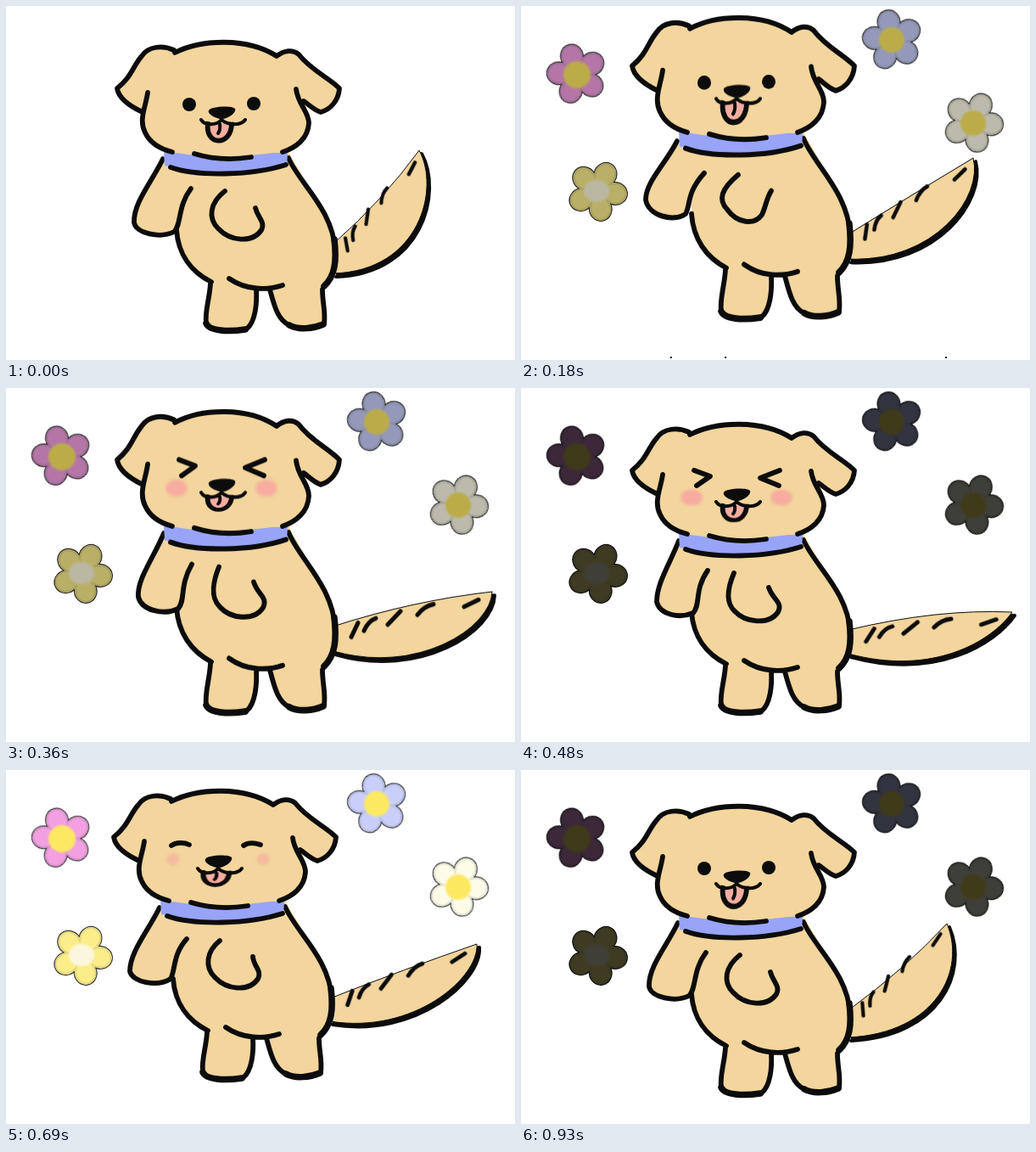
Write an HTML page without scripts that moves like this. It is 600 px wide and 417 px high and loops after 990 ms.

```html
<!DOCTYPE html>
<html lang="en">
<head>
<meta charset="utf-8">
<title>Happy puppy</title>
<style>
html, body { margin: 0; width: 100%; height: 100%; overflow: hidden; background: #fff; }
svg { display: block; width: 100vw; height: 100vh; }

/* Nine held poses played forwards, then backwards. */
.dog, .tail, .hashes, .arm, .paw, .tongue, .flowers, .open, .smile, .squint, .blush {
  animation: 495ms step-end -962ms infinite alternate;
}

.line { fill: none; stroke: #0c0c0c; stroke-width: 5.8; stroke-linecap: round; stroke-linejoin: round; }
.heavy { stroke-width: 7.5; }
.thin { stroke-width: 4; }
.fur { fill: #f3d59d; }
.ink { fill: #0c0c0c; }

.dog { transform-origin: 0 382px; animation-name: hop; }
@keyframes hop {
  18.18% { transform: scaleY(1.044); }
  30.3% { transform: translateY(-14px) scaleY(1.044); }
  42.42% { transform: translate(-2px, -20px) scaleY(1.02); }
  54.55% { transform: translate(-4px, -18px); }
  66.67% { transform: scaleY(1.044); }
  78.79%, 100% { transform: none; }
}

.tail { d: path("M386 280Q445 228 487 170C512 215 488 312 386 315"); animation-name: wag; }
@keyframes wag {
  6.06% { d: path("M386 283Q452 235 502 181C525 235 490 310 386 315"); }
  18.18% { d: path("M386 285Q458 238 517 191C535 240 488 315 386 315"); }
  30.3% { d: path("M386 287Q465 240 533 201C545 245 488 319 386 315"); }
  42.42% { d: path("M386 287Q470 246 547 212C554 254 488 326 386 315"); }
  54.55% { d: path("M386 287Q475 252 559 223C562 262 485 330 386 314"); }
  66.67% { d: path("M386 285Q480 256 573 246C572 287 485 340 386 313"); }
  78.79% { d: path("M386 285Q490 255 576 254C560 288 486 338 386 313"); }
  90.91%, 100% { d: path("M386 285Q490 260 579 264C555 298 486 340 386 313"); }
}

.hashes { stroke-width: 5; transform-origin: 391px 295px; transform: rotate(-37deg) scale(.84); animation-name: swing; }
@keyframes swing {
  6.06% { transform: rotate(-31deg) scale(.85); }
  18.18% { transform: rotate(-24deg) scale(.87); }
  30.3% { transform: rotate(-18deg) scale(.91); }
  42.42% { transform: rotate(-13deg) scale(.94); }
  54.55% { transform: rotate(-8deg) scale(.97); }
  66.67% { transform: none; }
  78.79% { transform: rotate(3deg); }
  90.91%, 100% { transform: rotate(6deg); }
}

.arm { d: path("M185 180C172 207 150 232 151 255C153 268 182 274 198 266C207 258 202 236 218 215"); animation-name: arm; }
@keyframes arm {
  30.3% { d: path("M184 182C170 208 147 228 147 248C150 266 180 274 194 264C200 254 195 240 216 218"); }
  54.55% { d: path("M185 180C172 207 150 232 150 255C153 268 182 274 198 264C204 254 200 236 217 217"); }
  66.67% { d: path("M186 180C174 208 154 232 156 252C160 267 186 273 203 265C212 255 204 240 219 215"); }
  78.79%, 100% { d: path("M186 180C175 208 160 230 160 252C164 267 186 272 203 265C212 255 204 238 220 215"); }
}

.paw { d: path("M258 218C240 232 238 250 250 262C264 277 290 280 301 264C306 254 297 250 294 238"); animation-name: paw; }
@keyframes paw {
  30.3% { d: path("M256 220C236 236 232 248 243 259C255 275 275 277 284 265C289 255 289 247 295 238"); }
  42.42% { d: path("M256 219C240 232 238 250 250 262C264 277 290 280 301 264C306 254 296 250 295 238"); }
  66.67%, 100% { d: path("M251 218C245 232 240 252 252 263C264 276 292 280 303 264C309 252 297 250 292 235"); }
}

.tongue { transform-origin: 252px 138px; animation-name: lick; }
@keyframes lick {
  6.06% { transform: scaleY(1.1); }
  54.55% { transform: scale(1.08, .75); }
  66.67% { transform: scaleY(.75); }
  78.79%, 100% { transform: scaleY(.86); }
}

.flowers { visibility: hidden; animation-name: glow; }
@keyframes glow {
  6.06% { visibility: visible; filter: brightness(.25); }
  18.18% { visibility: visible; filter: brightness(.49); }
  30.3% { visibility: visible; filter: brightness(.74); }
  42.42% { visibility: visible; filter: none; }
  66.67% { visibility: visible; filter: brightness(.74); }
  78.79% { visibility: visible; filter: brightness(.49); }
  90.91%, 100% { visibility: visible; filter: brightness(.25); }
}

.smile, .squint, .blush { visibility: hidden; }
.open { animation-name: open; }
.smile { animation-name: smile; }
.squint { animation-name: squint; }
.blush { fill: #f8a8a0; transform-box: fill-box; transform-origin: center; animation-name: blush; }
@keyframes open { 54.55%, 100% { visibility: hidden; } }
@keyframes smile { 54.55% { visibility: visible; } 66.67%, 100% { visibility: hidden; } }
@keyframes squint { 66.67%, 100% { visibility: visible; } }
@keyframes blush {
  54.55% { visibility: visible; opacity: .6; transform: translateY(-6px) scale(.42, .7); }
  66.67% { visibility: visible; opacity: .9; transform: scale(.75, .95); }
  78.79%, 100% { visibility: visible; }
}

.specks { visibility: hidden; animation: specks 990ms step-end infinite; }
@keyframes specks { 18.1% { visibility: visible; } 24.1% { visibility: hidden; } }
</style>
</head>
<body>
<svg viewBox="0 0 600 417" preserveAspectRatio="none">
  <defs>
    <path id="petals" d="M-12.3-17A13 14 0 1 1 12.3-17A13 14 72 1 1 20 6.5A13 14 144 1 1 0 21A13 14 36 1 1-20 6.5A13 14 108 1 1-12.3-17Z"/>
    <clipPath id="inside"><use href="#petals"/></clipPath>
    <g id="flower">
      <use href="#petals" stroke="#333" stroke-width="1.8"/>
      <use href="#petals" stroke="#555" stroke-opacity=".14" stroke-width="5" clip-path="url(#inside)"/>
    </g>
    <filter id="soft"><feGaussianBlur stdDeviation="1.2"/></filter>
    <filter id="haze" x="-30%" y="-30%" width="160%" height="160%"><feGaussianBlur stdDeviation="1.8"/></filter>
  </defs>

  <g class="flowers">
    <use href="#flower" fill="#f3a0e2" transform="translate(66 80) rotate(-16)"/>
    <use href="#flower" fill="#c9cffa" transform="translate(438 40) rotate(-12)"/>
    <use href="#flower" fill="#fdfce8" transform="translate(533 137) rotate(24)"/>
    <use href="#flower" fill="#fbed8a" transform="translate(90 218) rotate(26)"/>
    <g fill="#fde862" filter="url(#soft)">
      <circle cx="66" cy="81" r="16"/>
      <circle cx="437" cy="40" r="15"/>
      <circle cx="533" cy="138" r="15"/>
      <ellipse cx="89" cy="218" rx="15" ry="13" fill="#fbf7dc"/>
    </g>
  </g>

  <g class="dog">
    <path class="tail line thin" style="fill:#0c0c0c" transform="translate(3 4)"/>
    <path class="tail fur" stroke="#0c0c0c"/>
    <path class="hashes line" d="M415 281L407 297M436 276Q427 279 422 290M465 268L450 283M504 260Q493 262 485 272M557 255L540 263"/>

    <path class="fur" d="M187 172C192 215 200 240 202 265C203 292 218 313 242 325C238 345 234 360 236 374C240 383 262 384 282 381C293 376 295 355 295 332L311 332C316 352 320 371 334 377C345 382 362 380 374 375C378 360 373 345 374 332C386 322 390 305 389 292C388 255 360 220 333 172Z"/>
    <path class="line" d="M201 264C203 292 218 313 242 325M241 327C240 345 234 360 236 374M295 334C296 350 294 372 284 380M311 334C316 352 320 370 334 376M373 334C373 350 377 360 375 374M263 321C283 335 308 335 326 329"/>
    <path class="line heavy" d="M236 374C240 383 262 384 282 381M334 376C345 382 362 380 374 375M387 275C390 300 388 318 375 330"/>
    <path class="line" d="M333 179C345 208 386 240 388 288"/>

    <path class="arm line" style="fill:#f3d59d"/>
    <path class="paw line"/>

    <path d="M186 171L332 173L331 188Q260 206 187 188Z" fill="#98a4f8"/>
    <path class="line" d="M194 190C225 201 290 200 330 187"/>

    <path class="fur" d="M199 52C185 44 168 46 160 58C150 70 148 84 131 97C132 110 148 120 160 125C157 138 160 152 170 160C180 168 190 171 200 173Q255 182 322 172C340 168 356 158 357 142C358 134 356 126 353 114C360 119 364 124 371 125C382 122 392 112 393 97C380 84 360 76 345 57C338 51 328 52 319 58C285 37 230 39 199 52Z"/>
    <path class="line" d="M199 55C230 39 285 37 319 59M198 52C185 46 168 47 160 59C150 70 148 84 131 97C133 110 148 119 161 125M167 102C165 118 156 134 164 149C170 162 184 169 196 172M319 59C328 52 338 51 345 57C360 76 380 84 393 97C392 112 382 122 371 125C364 123 358 117 351 112M342 98C344 116 357 124 357 138C356 156 342 167 326 172"/>
    <path class="line" d="M222 174C245 181 270 181 289 178"/>

    <g filter="url(#haze)">
      <ellipse class="blush" cx="201" cy="129" rx="17" ry="10"/>
      <ellipse class="blush" cx="307" cy="129" rx="17" ry="10"/>
    </g>
    <g class="open ink">
      <circle cx="216" cy="116" r="8"/>
      <circle cx="292" cy="115" r="8"/>
    </g>
    <path class="smile line" d="M199 107C204 103 214 103 220 106M284 107C290 103 298 104 304 106"/>
    <path class="squint line" d="M204 97L223 104L207 115M305 97L282 106L304 115"/>

    <g class="tongue">
      <path class="line" style="fill:#f4ada1" d="M238 138C234 165 266 166 266 138"/>
      <path class="line thin" d="M252 139Q253 146 250 150"/>
    </g>
    <path class="fur" d="M232 134Q246 140 254 133Q264 140 280 134L254 129Z"/>
    <path class="line thin" d="M230 134C234 141 248 141 254 134C262 141 277 141 282 134"/>
    <path class="ink" d="M239 123C241 118 267 117 270 121C272 126 261 133 255 133C249 133 237 128 239 123Z"/>
  </g>

  <path class="specks" d="M176 414h2M240 414h2M500 414h2" stroke="#0c0c0c" stroke-width="2"/>
</svg>
</body>
</html>
```
